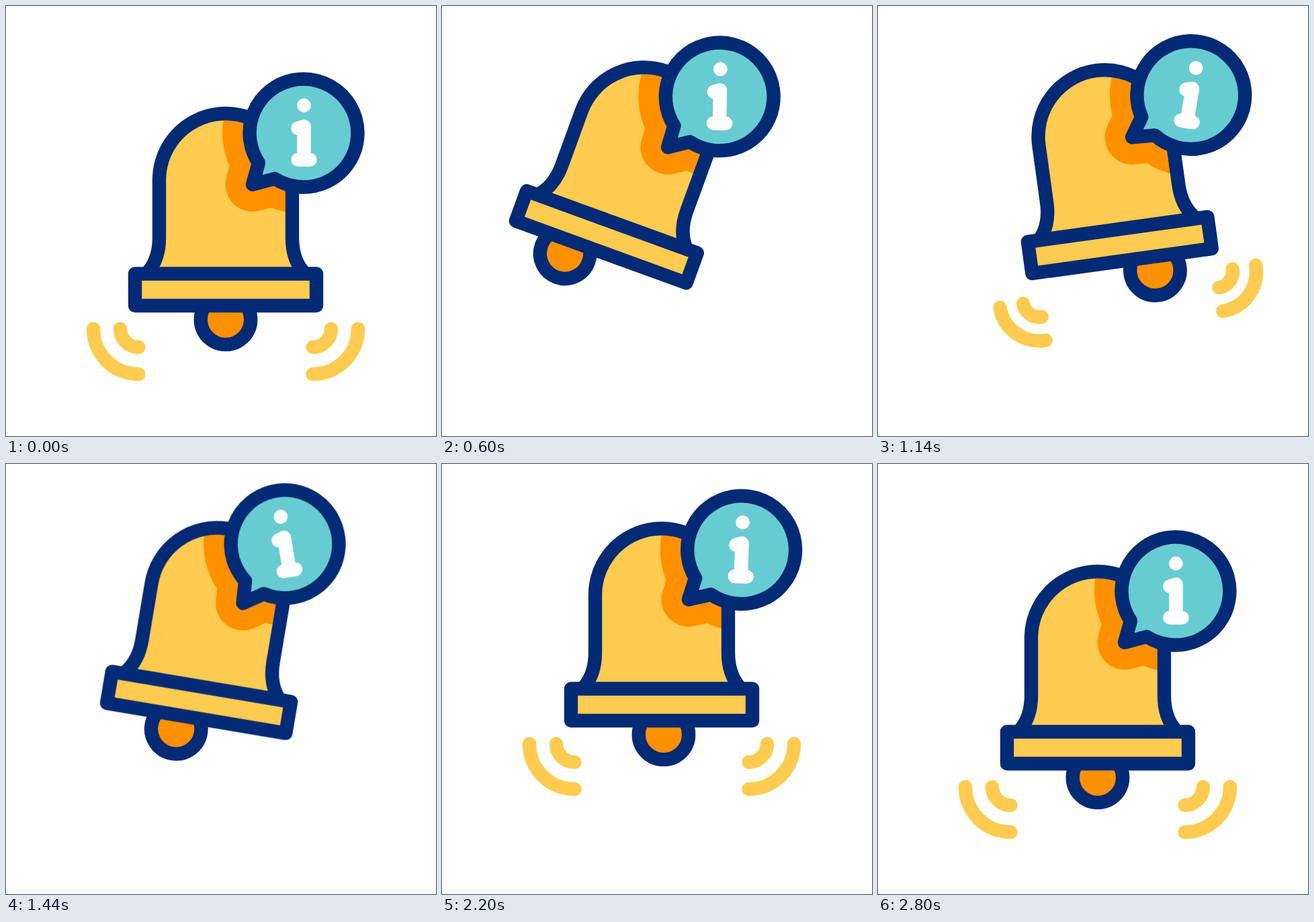
Animation, 640 px wide and 640 px high, one loop 2.82 s. Source, as an HTML page:

```html
<!DOCTYPE html>
<html lang="en">
<head>
<meta charset="utf-8">
<title>Ringing bell</title>
<style>
  html, body { margin: 0; width: 100%; height: 100%; overflow: hidden; background: #fff; }
  svg { display: block; width: 100vw; height: 100vh; }
  .line { stroke: #032a75; stroke-width: 20.4; stroke-linecap: round; stroke-linejoin: round; }
  .yellow { fill: #ffcb50; }
  .orange { fill: #ff9100; }
  .teal { fill: #67ccd2; }
  .none { fill: none; }
  .shade { fill: #ff9100; stroke: #ff9100; stroke-width: 81; stroke-linejoin: round; }
  .wave { fill: none; stroke: #ffcb50; stroke-width: 20.4; stroke-linecap: round; vector-effect: non-scaling-stroke; }
  .mark { fill: none; stroke: #fff; stroke-width: 20.6; stroke-linecap: round; stroke-linejoin: round; }
</style>
</head>
<body>
<svg viewBox="0 0 640 640">
  <defs>
    <path id="dome" d="M212 395 C222 383 228 365 228 345 V259 A99 99 0 0 1 426 259 V345 C426 365 432 383 442 395"/>
    <path id="balloon" d="M376 233.5 A80.4 80.4 0 1 1 400 257 L367 265.7 Z"/>
    <g id="wave">
      <path class="wave" d="M130 480.5 A67.5 67.5 0 0 0 197.5 548"/>
      <path class="wave" d="M170 480.5 A27.3 27.3 0 0 0 197.5 507.8"/>
    </g>
    <clipPath id="inside"><use href="#dome"/></clipPath>
  </defs>
  <g id="bell">
    <g id="waves">
      <use class="ripple" href="#wave"/>
      <g transform="matrix(-1 0 0 1 654 0)"><use class="ripple" href="#wave"/></g>
    </g>
    <circle id="clapper" class="line orange" cx="327" cy="466.7" r="37.2"/>
    <use class="yellow" href="#dome"/>
    <g clip-path="url(#inside)"><use class="tilt shade" href="#balloon"/></g>
    <use class="line none" href="#dome"/>
    <rect class="line yellow" x="192" y="398.5" width="270" height="47.5"/>
    <g class="tilt">
      <use class="line teal" href="#balloon"/>
      <circle cx="443.5" cy="148" r="10.4" fill="#fff"/>
      <path class="mark" d="M434.5 182 L443.5 179.3 V228.7 M434.5 228.7 H452.5"/>
    </g>
  </g>
</svg>
<script>
  const LOOP = 2820, RISE = 600, BEAT = 400, LAG = 80;

  // Smooth ramp from 0 to 1 that begins at `start` and lasts `length` ms.
  function ease(t, start, length) {
    const u = Math.min(1, Math.max(0, (t - start) / length));
    return u * u * (3 - 2 * u);
  }

  // Swings from side to side: the first stroke lasts RISE, each later one a BEAT.
  // size(i) is the reach of stroke i.
  function ring(t, size) {
    const peak = i => i < 0 || i > 3 ? 0 : (i % 2 ? -1 : 1) * size(i);
    const i = Math.max(0, Math.floor((t - RISE) / BEAT) + 1);
    const part = i ? ease(t, RISE + (i - 1) * BEAT, BEAT) : ease(t, 0, RISE);
    return peak(i - 1) + (peak(i) - peak(i - 1)) * part;
  }

  // The waves leave, cross once from the bell outwards, then come back to rest.
  function ripple(t) {
    const leave = ease(t, 300, 320), cross = ease(t, 800, 680), settle = ease(t, 1680, 400);
    const glow = 1 - ease(t, 300, 290) + ease(t, 830, 200) - ease(t, 1200, 160) + ease(t, 1735, 200);
    const twist = -1.5 * Math.sin(Math.PI * cross);
    if (t < 700) return { glow, twist, spread: 21 * leave, grow: 1 };
    if (t < 1600) return { glow, twist, spread: 42 * cross - 21, grow: cross };
    return { glow, twist, spread: 21 * settle - 21, grow: settle };
  }

  const byId = id => document.getElementById(id);
  const bell = byId('bell'), waves = byId('waves'), clapper = byId('clapper');
  const tilted = document.querySelectorAll('.tilt');
  const ripples = document.querySelectorAll('.ripple');
  const move = (el, value) => el.setAttribute('transform', value);

  function draw(t) {
    const lift = -64 * (ease(t, 0, RISE) - ease(t, 2200, RISE));
    const swing = ring(t, i => 20 - 5 * i);
    const tilt = ring(t - LAG, () => -20);
    const knock = ring(t - LAG, i => i < 2 ? -52 : -29);
    move(bell, `translate(0 ${lift}) rotate(${swing} 327 182)`);
    move(clapper, `translate(${knock} 0)`);
    tilted.forEach(el => move(el, `rotate(${tilt} 367 265.7)`));

    const { glow, twist, spread, grow } = ripple(t);
    const scale = 0.76 + 0.24 * grow;
    move(waves, `rotate(${twist} 327 351)`);
    waves.setAttribute('opacity', glow);
    ripples.forEach(el => move(el,
      `translate(${164 - spread} ${514 + spread}) scale(${scale}) translate(-164 -514)`));
  }

  const start = performance.now();
  function tick() {
    draw((performance.now() - start) % LOOP);
    requestAnimationFrame(tick);
  }
  draw(0);
  requestAnimationFrame(tick);
</script>
</body>
</html>
```
